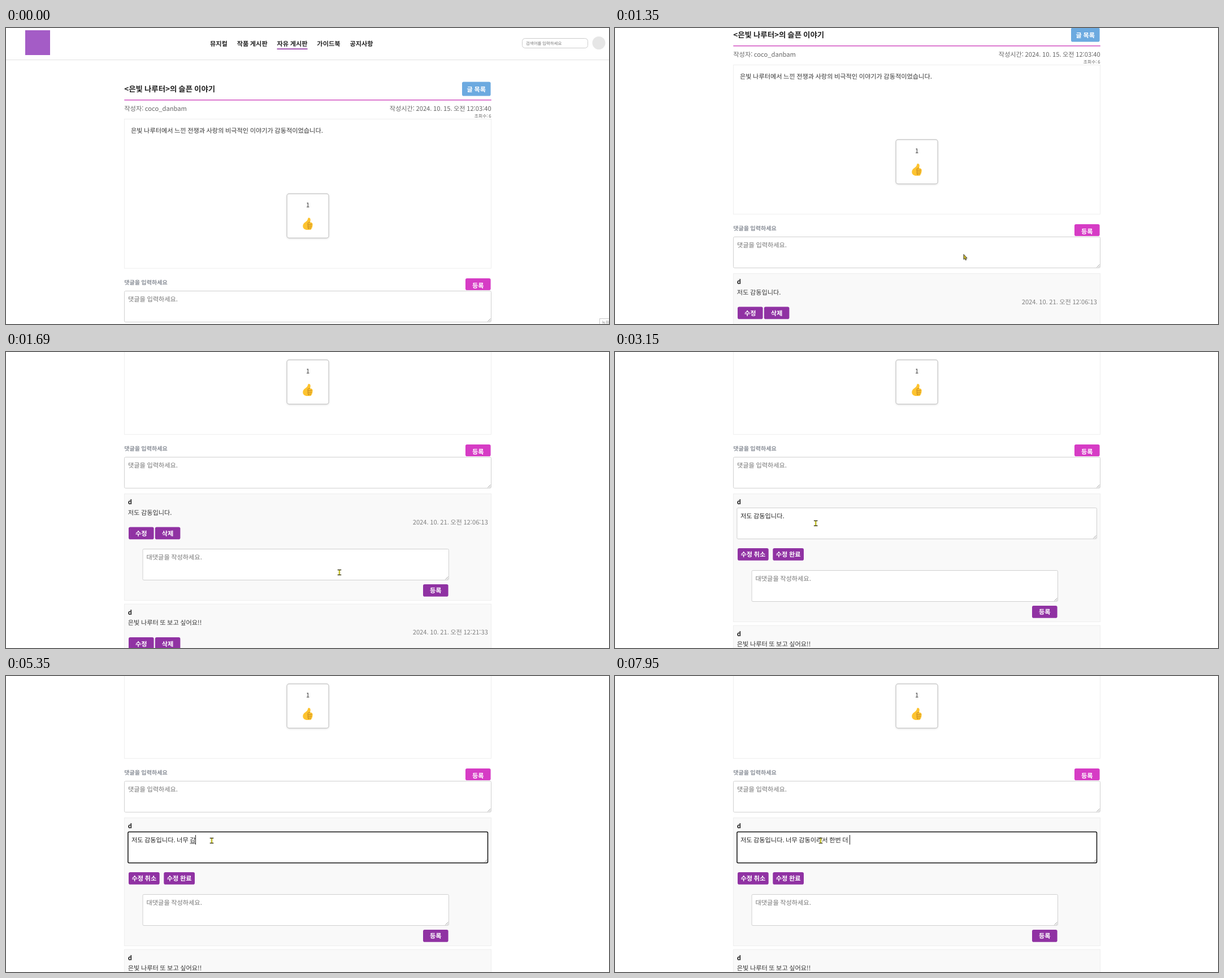
These frames come from a looping animation (1067 by 525 pixels, 8 s). An HTML page:

```html
<!DOCTYPE html>
<html lang="ko">
<head>
<meta charset="utf-8">
<title>자유 게시판</title>
<style>
  html, body { margin: 0; width: 100%; height: 100%; overflow: hidden; background: #fff; }
  svg { display: block; width: 1067px; height: 525px; }
  text {
    font-family: "Noto Sans CJK KR", "Noto Sans KR", "Noto Sans CJK JP", "Noto Sans CJK SC", sans-serif;
    white-space: pre; text-rendering: geometricPrecision;
  }
</style>
</head>
<body>
<svg id="stage" viewBox="0 0 1067 525"></svg>
<script>
const LOOP = 8000, SIZE = 11.2, SPACE = 0.224, EDIT_SHIFT = 38;
const PURPLE = '#9032a3', PINK = '#d63cc5', INK = '#333', MUTED = '#757575';
const SHOW = '은빛 나루터';
const stage = document.getElementById('stage');

function add(parent, tag, attrs = {}) {
  const el = document.createElementNS('http://www.w3.org/2000/svg', tag);
  for (const key in attrs) el.setAttribute(key, attrs[key]);
  parent.append(el);
  return el;
}
const group = (parent, attrs) => add(parent, 'g', attrs);
const rect = (parent, x, y, width, height, fill, more) =>
  add(parent, 'rect', { x, y, width, height, fill, ...more });
const path = (parent, d, more) => add(parent, 'path', { d, fill: 'none', ...more });

// Browsers may round the space advance; return what brings it back to SPACE.
function spaceFix(el, size) {
  const length = str => {
    el.textContent = str;
    return el.getComputedTextLength();
  };
  return SPACE * size - (length('가 가') - length('가가'));
}
function text(parent, x, y, str, { size = SIZE, fill = INK, bold, anchor = 'start' } = {}) {
  const el = add(parent, 'text', {
    x, y, fill, 'font-size': size, 'font-weight': bold ? 700 : 400, 'text-anchor': anchor
  });
  el.style.wordSpacing = spaceFix(el, size) + 'px';
  el.textContent = str;
  return el;
}
function button(parent, x, y, w, h, label, fill, baseline = y + 15.4) {
  rect(parent, x, y, w, h, fill, { rx: 2.8 });
  text(parent, x + w / 2, baseline, label, { fill: '#fff', bold: true, anchor: 'middle' });
}
function textarea(parent, x, y, w, placeholder) {
  const box = rect(parent, x, y, w, 55, '#fff', { rx: 2, stroke: '#d0d0d0' });
  const r = x + w - 1, b = y + 54;
  path(parent, `M${r - 5} ${b}L${r} ${b - 5}M${r - 2} ${b}L${r} ${b - 2}`,
    { stroke: '#888', 'stroke-width': 0.8 });
  if (placeholder) text(parent, x + 6.5, y + 18.5, placeholder, { fill: MUTED });
  return box;
}
const card = (parent, y, h) => rect(parent, 209.5, y, 649, h, '#f9f9f9', { stroke: '#eeeeee' });

// Page, laid out in document coordinates
const page = group(stage);

function buildHeader() {
  rect(page, 34, 4, 44, 44, '#a45cc6');
  let x = 361;
  for (const label of ['뮤지컬', '작품 게시판', '자유 게시판', '가이드북', '공지사항']) {
    text(page, x, 32, label, { fill: '#222', bold: true });
    const width = measure(label);
    if (label === '자유 게시판') rect(page, x, 36.4, width, 1.6, PURPLE);
    x += width + 16.8;
  }
  rect(page, 913.5, 18.5, 116, 17, '#fff', { rx: 5, stroke: '#cccccc' });
  text(page, 920, 30.2, '검색어를 입력하세요', { size: 7.45, fill: MUTED });
  add(page, 'circle', { cx: 1049, cy: 26.5, r: 11.5, fill: '#e6e6e6' });
  rect(page, 0, 56, 1067, 1, '#e2e2e2');
}

function buildPost() {
  text(page, 209.3, 113, `<${SHOW}>의 슬픈 이야기`, { size: 13.44, fill: '#222', bold: true });
  button(page, 807, 95.5, 50.6, 25, '글 목록', '#6caae0', 112.7);
  rect(page, 209.3, 127, 649.5, 1.4, '#cf45bd');
  text(page, 209.3, 146.8, '작성자: coco_danbam', { fill: '#666' });
  text(page, 858.7, 146.8, '작성시간: 2024. 10. 15. 오전 12:03:40', { fill: '#666', anchor: 'end' });
  text(page, 858.7, 159, '조회수: 6', { size: 7.84, fill: '#666', anchor: 'end' });
  rect(page, 209.5, 161.5, 649, 264.7, '#fff', { stroke: '#eeeeee' });
  text(page, 221, 186, `${SHOW}에서 느낀 전쟁과 사랑의 비극적인 이야기가 감동적이었습니다.`);

  rect(page, 497.1, 294, 74, 78.5, '#fff', {
    rx: 4, stroke: '#cccccc', 'stroke-width': 1.4,
    style: 'filter:drop-shadow(0 1.4px 1.4px rgba(0,0,0,.1))'
  });
  text(page, 534, 318, '1', { anchor: 'middle' });
  const thumb = group(page, { transform: 'translate(525 336.2)' });
  path(thumb, 'M11 .4C9.6.3 9.3 1.4 9 2.8C8.5 5 6.6 6.6 4.4 8.2C1.8 10 .3 11.8.3 15C.3 19.4 3.6 21.8 8.2 21.8' +
    'H13.4Q15.8 21.6 15.6 19.4Q17.2 18.6 16.8 16.6Q18 15.4 17.4 13.4Q18.2 11.6 17 10Q16.4 8.4 13 8.3' +
    'C13.8 5.6 14 3.6 13.4 2Q12.8.4 11 .4Z', { fill: '#fdc32f' });
  path(thumb, 'M13 8.3Q9.6 8.2 8.9 10Q9.6 11.2 9 12.8Q9.7 14.2 9.2 16Q9.6 18.4 10.4 20.6' +
    'M9.2 12H16.4M9.3 15.2H16M9.6 18.4H15', { stroke: '#bd7f1f', 'stroke-width': 0.9 });

  text(page, 209.3, 455, '댓글을 입력하세요', { size: 10.08, fill: '#8a8f98', bold: true });
  button(page, 813, 444, 44.6, 21, '등록', PINK, 460.8);
  textarea(page, 209.5, 466.5, 649, '댓글을 입력하세요.');
}

function buildComment(parent, y, body, date) {
  text(parent, 215.8, y + 37.8, body);
  text(parent, 852.9, y + 54.6, date, { fill: '#808080', anchor: 'end' });
  button(parent, 217, y + 59.5, 44.6, 21.7, '수정', PURPLE);
  button(parent, 263.8, y + 59.5, 44.6, 21.7, '삭제', PURPLE);
}
const author = (parent, y) => text(parent, 215.8, y + 19, 'd', { fill: '#222', bold: true });

// Hangul and jamo share one advance; spaces and periods are narrow.
function measure(str) {
  const advance = c => c === ' ' ? SPACE : c === '.' ? 0.278 : 0.92;
  return [...str].reduce((sum, c) => sum + advance(c), 0) * SIZE;
}

buildHeader();
buildPost();

const TOP = 531;
const view = group(page), edit = group(page), lower = group(page);
card(view, TOP + 0.5, 189);
card(edit, TOP + 0.5, 189 + EDIT_SHIFT);
author(page, TOP);
buildComment(view, TOP, '저도 감동입니다.', '2024. 10. 21. 오전 12:06:13');

const editBox = textarea(edit, 215.9, TOP + 25.5, 636.6);
button(edit, 217, TOP + 97, 54.7, 21.7, '수정 취소', PURPLE);
button(edit, 279.3, TOP + 97, 54.7, 21.7, '수정 완료', PURPLE);
const TYPE_X = 221.9, TYPE_Y = TOP + 44;
const typed = text(edit, TYPE_X, TYPE_Y, '', { fill: '#222' });
const underline = rect(edit, 0, TYPE_Y + 1.6, 0, 0.8, '#222');
const caret = rect(edit, 0, TOP + 31, 1, 17, '#222');

textarea(lower, 242, TOP + 98.5, 541.5, '대댓글을 작성하세요.');
button(lower, 738, TOP + 161, 44.6, 21.7, '등록', PURPLE);
const NEXT = TOP + 195.6;
card(lower, NEXT + 0.5, 189);
author(lower, NEXT);
buildComment(lower, NEXT, `${SHOW} 또 보고 싶어요!!`, '2024. 10. 21. 오전 12:21:33');

// Overlay, fixed to the window
const tip = group(stage);
rect(tip, 1050.5, 515.5, 30, 20, '#fff', { stroke: '#c8c8c8' });
text(tip, 1054, 525.3, '녹화', { size: 7.4, fill: '#999' });

const pointer = group(stage);
const arrow = path(pointer, 'M0 0V9L2 7.3L3.4 10.3L4.9 9.6L3.6 6.7H6.2Z',
  { fill: '#cdb92a', stroke: '#333', 'stroke-width': 0.9, 'stroke-linejoin': 'round' });
const beam = group(pointer);
rect(beam, -1.2, -4.5, 2.4, 9, '#8a8822');
rect(beam, -0.8, -4, 1.6, 8, '#d8d32c');
rect(beam, -3.3, -5.2, 6.6, 1.5, '#454321');
rect(beam, -3.3, 3.7, 6.6, 1.5, '#454321');

// Motion tables
const EDIT_AT = 2600, FOCUS_AT = 3350, TICK = 69.3, MOVE_AT = 580;
const scrollKeys = [[1210, 0], [1342, 96], [1480, 200], [1610, 268], [1685, 280]];
const pointerKeys = [
  [580, 1000, 521], [760, 880, 478], [1000, 690, 425], [1200, 620, 403], [1341, 617, 401.5],
  [1480, 612, 399], [1688, 590.5, 391], [1950, 420, 362], [2250, 262, 330], [2450, 240, 322],
  [2650, 242, 321], [2960, 350, 305], [3140, 355, 304], [3345, 364, 292]
];
const BASE = '저도 감동입니다.';
// time, settled text, syllable being composed
const typing = [
  [FOCUS_AT, ''], [4280, ' '],
  [4550, ' ', 'ㄴ'], [4650, ' ', '너'], [4760, ' ', '넘'], [4860, ' 너', '무'], [4960, ' 너무 '],
  [5070, ' 너무 ', 'ㄱ'], [5210, ' 너무 ', '가'], [5310, ' 너무 ', '감'], [5420, ' 너무 감', 'ㄷ'],
  [5520, ' 너무 감', '도'], [5630, ' 너무 감', '동'], [5730, ' 너무 감동', 'ㅇ'],
  [5840, ' 너무 감동', '이'], [5940, ' 너무 감동', '일'], [6070, ' 너무 감동이', '라'],
  [6170, ' 너무 감동이', '랏'], [6270, ' 너무 감동이라', '서'], [6420, ' 너무 감동이라서 '],
  [7010, ' 너무 감동이라서 ', 'ㅎ'], [7110, ' 너무 감동이라서 ', '하'], [7210, ' 너무 감동이라서 ', '한'],
  [7410, ' 너무 감동이라서 한', 'ㅂ'], [7500, ' 너무 감동이라서 한', '버'], [7590, ' 너무 감동이라서 한', '번'],
  [7680, ' 너무 감동이라서 한번 '], [7770, ' 너무 감동이라서 한번 ', 'ㄷ'],
  [7860, ' 너무 감동이라서 한번 ', '더'], [7950, ' 너무 감동이라서 한번 더 ']
];

function track(keys, t) {
  const i = keys.findIndex(k => k[0] > t);
  if (i === 0) return keys[0].slice(1);
  if (i < 0) return keys[keys.length - 1].slice(1);
  const a = keys[i - 1], b = keys[i], p = (t - a[0]) / (b[0] - a[0]);
  return a.slice(1).map((v, n) => v + (b[n + 1] - v) * p);
}
const show = (el, on) => el.setAttribute('display', on ? 'inline' : 'none');

function drawTyping(t) {
  const focused = t >= FOCUS_AT;
  const [since, settled, composing = ''] = typing.filter(row => row[0] <= t).pop() || [0, ''];
  const start = TYPE_X + measure(BASE + settled), width = measure(composing);
  typed.textContent = BASE + settled + composing;
  underline.setAttribute('x', start);
  underline.setAttribute('width', width);
  caret.setAttribute('x', Math.floor(start + width));
  show(caret, focused && (t - since) % 1060 < 530);
  editBox.setAttribute('stroke', focused ? '#101010' : '#d0d0d0');
  editBox.setAttribute('stroke-width', focused ? 1.5 : 1);
}

function draw(t) {
  const step = MOVE_AT + Math.floor((t - MOVE_AT + 1) / TICK) * TICK;
  const editing = t >= EDIT_AT;
  const [scroll] = track(scrollKeys, step);
  const [x, y] = track(pointerKeys, step);
  const onText = t >= 1685 && t < 2290 || editing;

  page.setAttribute('transform', `translate(0 ${-Math.round(scroll)})`);
  lower.setAttribute('transform', `translate(0 ${editing ? EDIT_SHIFT : 0})`);
  pointer.setAttribute('transform', `translate(${x} ${y})`);
  show(view, !editing);
  show(edit, editing);
  show(tip, t < 70);
  show(pointer, t >= MOVE_AT);
  show(arrow, !onText);
  show(beam, onText);
  drawTyping(t);
}

const begin = performance.now();
function frame() {
  draw((performance.now() - begin) % LOOP);
  requestAnimationFrame(frame);
}
frame();
</script>
</body>
</html>
```
